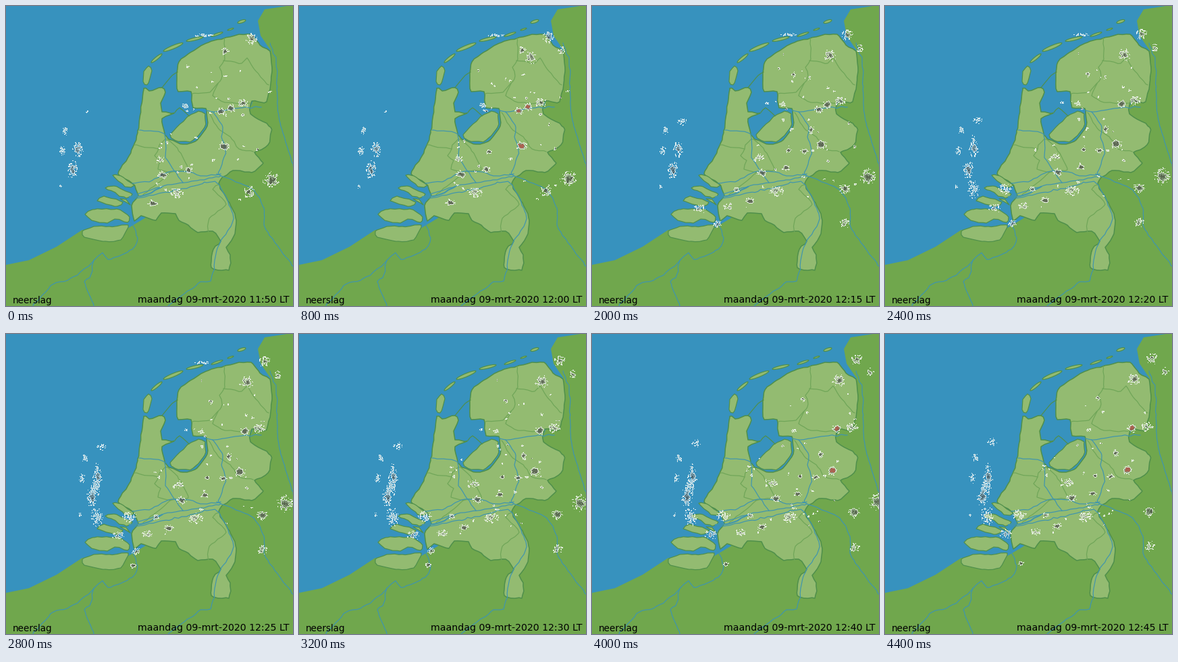
These frames come from a looping animation (425x445 px, 5600 ms). A matplotlib script:

```python
import numpy as np
import matplotlib.pyplot as plt
from matplotlib.animation import FuncAnimation

W, H, DPI = 425, 445, 100
STEPS, HOLD = 12, 2          # five-minute radar steps, extra beats on the last one
SEA, ABROAD, LAND = "#3792be", "#70a74d", "#93bb71"
SHORE, PROVINCE, RIVER = "#4f8f4b", "#6fa558", "#3f95ae"

plt.rcParams["font.family"] = "DejaVu Sans"
fig = plt.figure(figsize=(W / DPI, H / DPI), dpi=DPI, facecolor=SEA)
ax = fig.add_axes([0, 0, 1, 1])
ax.axis("off")
rng = np.random.default_rng(9)


def curve(points, closed=False, wobble=0.5):
    """Hermite curve through the points with a slight natural roughness."""
    p = np.array(points, float)
    if closed:
        before, after, ends = np.roll(p, 1, 0), np.roll(p, -1, 0), np.roll(p, -1, 0)
    else:
        before, after, ends = np.vstack([p[:1], p[:-1]]), np.vstack([p[1:], p[-1:]]), p[1:]
    m = 0.3 * (after - before)
    out = []
    for i in range(len(ends)):
        j = (i + 1) % len(p)
        n = max(2, int(np.hypot(*(p[j] - p[i])) / 5))
        t = np.arange(n)[:, None] / n
        seg = ((1 + 2 * t) * (1 - t) ** 2 * p[i] + t * (1 - t) ** 2 * m[i]
               + t * t * (3 - 2 * t) * p[j] + t * t * (t - 1) * m[j])
        seg[1:] += rng.normal(0, wobble, seg[1:].shape)
        out.append(seg)
    return np.vstack(out + ([] if closed else [p[-1:]]))


def area(points, color=LAND, edge=SHORE, width=1.2):
    ax.add_patch(plt.Polygon(points, closed=True, fc=color, ec=edge, lw=width * 0.72,
                             joinstyle="round", zorder=1))


def coast(*points, width=1.2):
    area(curve(points, closed=True), width=width)


def shoal(x0, y0, x1, y1, width):
    """Slim barrier island between two tips."""
    a, b = np.array([x0, y0]), np.array([x1, y1])
    t = np.linspace(0, 2 * np.pi, 16)[:, None]
    side = np.array([y0 - y1, x1 - x0]) / np.hypot(*(b - a))
    area((a + b) / 2 + np.cos(t) * (b - a) / 2 + np.sin(t) * side * width / 2)


def line(color, *points, width=1.2, wobble=0.6):
    x, y = curve(points, wobble=wobble).T
    ax.plot(x, y, color=color, lw=width * 0.72, solid_joinstyle="round", zorder=2)


# ---- land ----
area([(0, 384), (34, 377), (75, 357), (113, 332), (150, 348), (210, 312), (330, 230),
      (370, 130), (392, 66), (377, 44), (373, 22), (383, 5), (416, 0), (W, 0), (W, H), (0, H)],
     ABROAD, "none")

north = [(391, 67), (376, 58), (363, 42), (345, 42), (300, 54), (270, 71), (256, 83),
         (253, 110), (255, 127), (274, 127), (277, 151), (296, 152), (298, 178),
         (280, 201), (262, 205), (238, 194)]
west = [(231, 167), (249, 159), (231, 157), (229, 144), (236, 128), (231, 121), (212, 126),
        (204, 122), (195, 188), (183, 221), (166, 249), (187, 263), (196, 281), (186, 296), (190, 319)]
south = [(200, 311), (222, 318), (230, 307), (251, 308), (256, 318), (270, 325), (284, 336),
         (306, 334), (318, 349), (307, 361), (304, 388), (330, 392), (332, 369), (326, 358)]
east = [(337, 342), (341, 318), (331, 292), (315, 263), (336, 244), (364, 247), (381, 233),
        (368, 217), (388, 206), (392, 180), (362, 160), (364, 141), (386, 142), (394, 96)]
coast(*north, *west, *south, *east, width=1.5)

coast((243, 191), (269, 164), (285, 156), (295, 160), (294, 180), (277, 199), (255, 201))
coast((158, 251), (170, 252), (190, 266), (176, 268))
coast((147, 270), (160, 267), (187, 279), (178, 285))
coast((135, 289), (145, 282), (173, 291), (165, 297))
coast((169, 286), (178, 287), (184, 295))
coast((117, 309), (128, 302), (164, 301), (183, 313), (180, 321), (161, 316), (150, 322), (127, 318))
coast((113, 334), (130, 327), (153, 327), (181, 325), (170, 347), (147, 349), (116, 343))
coast((203, 112), (204, 97), (211, 89), (216, 96), (209, 117))
shoal(215, 84, 231, 71, 4)
shoal(233, 67, 262, 55, 5)
shoal(267, 52, 292, 46, 4)
shoal(304, 45, 321, 39, 3)
shoal(328, 36, 337, 33, 2)
shoal(343, 25, 355, 21, 4)
line(SHORE, (231, 121), (246, 103), (254, 98), wobble=0)
line(SHORE, (250, 158), (257, 151), (271, 163), wobble=0)

# ---- provinces ----
line(PROVINCE, (323, 48), (324, 79), (316, 91), (320, 104), (302, 128), (276, 130))
line(PROVINCE, (322, 81), (349, 85), (357, 77), (367, 93), (389, 117))
line(PROVINCE, (314, 115), (306, 133), (324, 143), (361, 144))
line(PROVINCE, (300, 158), (314, 181), (334, 197), (345, 212), (366, 216))
line(PROVINCE, (190, 206), (226, 212), (220, 222), (229, 229), (225, 242), (246, 246))
line(PROVINCE, (226, 212), (236, 197), (254, 211), (270, 243), (246, 246), (203, 280))
line(PROVINCE, (315, 265), (306, 272), (326, 294), (301, 315), (300, 336))

# ---- rivers ----
line(RIVER, (425, 386), (384, 330), (382, 300), (367, 273), (337, 259), (312, 249))
line(RIVER, (391, 55), (400, 82), (401, 124), (405, 170), (425, 237))
line(RIVER, (240, 445), (290, 409), (303, 408), (314, 357), (333, 327), (336, 308), (314, 264),
     (297, 262), (246, 275), (188, 286))
line(RIVER, (184, 318), (195, 344), (187, 361), (151, 376), (143, 366), (119, 388), (91, 407),
     (69, 413), (40, 445))
line(RIVER, (130, 377), (124, 403), (116, 409), (130, 445))
line(RIVER, (315, 249), (325, 215), (319, 194), (321, 180), (306, 157), (297, 155))
line(RIVER, (318, 252), (283, 259), (231, 268), (183, 283))
line(RIVER, (318, 249), (288, 252), (271, 246), (241, 246), (216, 259), (187, 263))
line(RIVER, (197, 184), (235, 190), (236, 225), (252, 247), (262, 262))
line(RIVER, (306, 157), (350, 151), (378, 150))
line(RIVER, (183, 283), (204, 281), (231, 268), width=2)

# ---- rain ----
cells = []


def add_cells(vx, vy, aspect, rows):
    """Each row: x, y, radius, core strength, first step and optionally the last one."""
    for x, y, r, core, first, *last in rows:
        cells.append((x, y, vx, vy, r, r * aspect, core, first, last[0] if last else STEPS))


add_cells(4.15, -.05, 1.6, [
    (98, 242, 5.5, .62, 0), (106, 213, 5, .62, 0), (87, 184, 3, 0, 0), (83, 214, 3.2, 0, 0),
    (120, 156, 1.6, 0, 0, 4), (80, 268, 1.3, 0, 0), (105, 270, 6, .2, 6), (103, 228, 5, 0, 7),
    (106, 198, 3, 0, 6)])
add_cells(4.2, -1.8, .8, [(111, 180, 5, 0, 5)])
add_cells(0, -.2, .16, [(291, 43, 10, 0, 0, 7)])
add_cells(2.9, -1.05, 1, [
    (363, 48, 5.5, .62, 0), (382, 67, 4, .55, 2), (324, 67, 4, .75, 0, 3), (337, 78, 6, .72, 1),
    (283, 106, 3, .75, 3), (393, 258, 8, .72, 0), (359, 275, 6, .7, 0), (359, 326, 5, .45, 5),
    (333, 151, 4.5, .95, 0), (309, 188, 3.5, .8, 3)])
add_cells(3.4, -.6, .75, [
    (318, 156, 5, .95, 0, 5), (350, 144, 6, .6, 0), (322, 208, 6, .95, 0), (270, 243, 4, .9, 0),
    (274, 217, 3.5, .9, 2), (297, 218, 3.8, .9, 5), (217, 292, 5, .85, 0), (185, 300, 5, .4, 3),
    (142, 303, 6, .55, 3), (168, 326, 5, .5, 5, 9), (164, 347, 3.5, .8, 7), (265, 148, 3.5, 0, 0)])
add_cells(4, -.6, .75, [
    (232, 250, 5.5, .85, 0), (252, 277, 7, .4, 0), (228, 227, 5, .5, 0), (194, 275, 4, .7, 4),
    (154, 275, 7, 0, 6)])

for _ in range(105):
    first = int(rng.integers(-5, 11))
    x, y = rng.uniform(210, 388), rng.uniform(65, 290)
    if x < 255 and y < 195:
        y += 120
    cells.append((x - 3.4 * first, y + .8 * first, 3.4, -.8, rng.uniform(.8, 2.3),
                  rng.uniform(.8, 2), rng.choice([0, 0, 0, .7]), first,
                  first + int(rng.integers(3, 7))))

R = 26
dy, dx = np.mgrid[-R:R + 1, -R:R + 1]


def noise():
    n = rng.normal(size=dx.shape)
    n = sum(np.roll(n, s, a) for s in (-1, 0, 1) for a in (0, 1))
    return n / n.std()


textures = [(noise(), noise()) for _ in cells]


def rain_levels(step):
    level = np.zeros((H + 2 * R, W + 2 * R), int)
    for (x, y, vx, vy, rx, ry, core, first, last), (a, b) in zip(cells, textures):
        cx, cy = round(x + vx * step), round(y + vy * step)
        if not (first <= step <= last and 0 <= cx < W and 0 <= cy < H):
            continue
        turn = 0.22 * (step - first)
        n = a * np.cos(turn) + b * np.sin(turn)
        r2 = (dx / rx) ** 2 + (dy / ry) ** 2
        patch = ((1 - 0.7 * r2 + 0.8 * n > 0.45) & (r2 < 2.8)).astype(int)
        heat = core * np.exp(-0.9 * r2) + 0.1 * n * (core > 0)
        severe = core > 0.92 and step in (2, 4, 10, 11)
        patch[(heat > 0.36) & (r2 < 1.5)] = 2
        patch[(heat > 0.62) & (r2 < 1)] = 4 if severe else 3
        view = level[cy:cy + 2 * R + 1, cx:cx + 2 * R + 1]
        np.maximum(view, patch, out=view)
    return level


# dry, light, moderate, heavy, severe, outline
PALETTE = np.array([(0, 0, 0, 0), (222, 230, 222, 150), (135, 140, 138, 165),
                    (82, 82, 80, 190), (176, 78, 74, 205), (250, 252, 250, 215)], np.uint8)


def rain_image(step):
    level = rain_levels(step)
    wet = level > 0
    inner = wet.copy()
    for axis in (0, 1):
        for shift in (-1, 1):
            inner &= np.roll(wet, shift, axis)
    level[wet & ~inner & (level < 3)] = 5
    return PALETTE[level[R:R + H, R:R + W]]


rain = ax.imshow(rain_image(0), extent=(0, W, H, 0), interpolation="nearest",
                 aspect="auto", zorder=3)
ax.set_xlim(0, W)
ax.set_ylim(H, 0)
ax.text(10, 441, "neerslag", size=13.5 * 0.72, va="baseline", zorder=4)
clock = ax.text(419.5, 440, "", size=14.1 * 0.72, ha="right", va="baseline", zorder=4)


def update(frame):
    step = min(frame, STEPS - 1)
    minutes = 11 * 60 + 50 + 5 * step
    rain.set_data(rain_image(step))
    clock.set_text(f"maandag 09-mrt-2020 {minutes // 60}:{minutes % 60:02d} LT")
    return rain, clock


anim = FuncAnimation(fig, update, frames=STEPS + HOLD, interval=400, repeat=True, repeat_delay=0)
plt.show()
```
